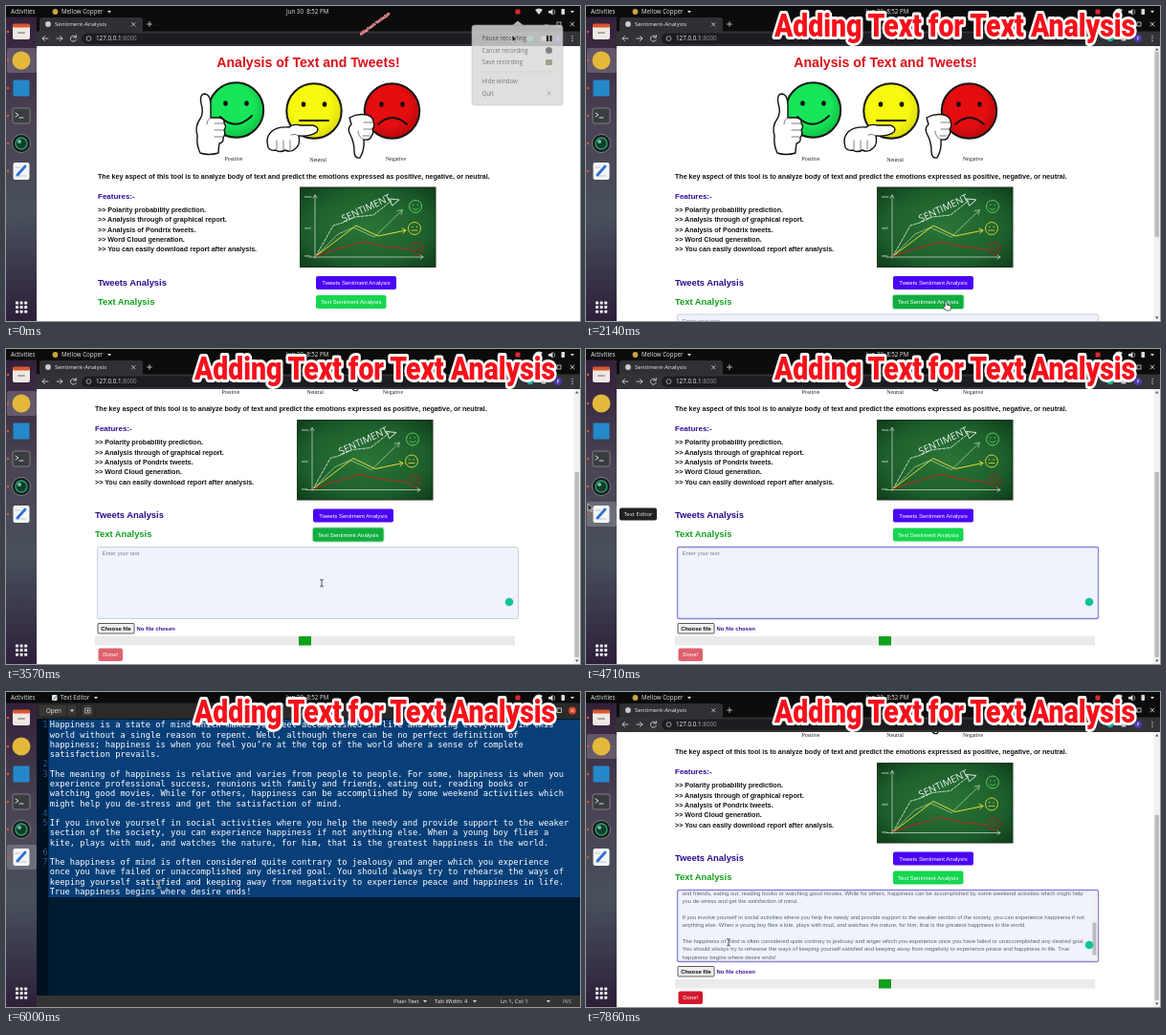
An HTML page that plays this animation: 600x330 px, repeating every 8000 ms.

```html
<!DOCTYPE html>
<html lang="en">
<head>
<meta charset="utf-8">
<title>Text analysis demo</title>
<style>
html, body { margin: 0; width: 100%; height: 100%; overflow: hidden; background: #fff; }
svg { display: block; width: 600px; height: 330px; }
text { white-space: pre; font-family: "Liberation Sans", Arial, sans-serif; }
.b { font-weight: 700; }
.ui { font-family: "Open Sans", "Noto Sans", sans-serif; }
.serif { font-family: "Liberation Serif", serif; }
.mono { font-family: "DejaVu Sans Mono", monospace; }
.title { font-family: Roboto, sans-serif; font-weight: 900; }
</style>
</head>
<body>
<svg id="stage" viewBox="0 0 600 330" xmlns="http://www.w3.org/2000/svg"></svg>
<script>
const STEP = 1000 / 7, LOOP = 8000;

// Text is placed by its left edge and vertical middle.
const text = (x, mid, size, str, fill, cls = "", more = "") =>
  `<text x="${x}" y="${mid + size * .35}" font-size="${size}" fill="${fill}" class="${cls}" ${more}>${str}</text>`;
const centred = (x, mid, size, str, fill, cls) => text(x, mid, size, str, fill, cls, 'text-anchor="middle"');
const rect = (x, y, w, h, fill, r = 0, more = "") =>
  `<rect x="${x}" y="${y}" width="${w}" height="${h}" rx="${r}" fill="${fill}" ${more}/>`;
const disc = (x, y, r, fill, more = "") => `<circle cx="${x}" cy="${y}" r="${r}" fill="${fill}" ${more}/>`;
const line = (d, stroke, w = 1, more = "") =>
  `<path d="${d}" fill="none" stroke="${stroke}" stroke-width="${w}" stroke-linecap="round" stroke-linejoin="round" ${more}/>`;
const shape = (d, fill, stroke = "none", w = 1) =>
  `<path d="${d}" fill="${fill}" stroke="${stroke}" stroke-width="${w}" stroke-linejoin="round"/>`;
const group = (id, body, more = "") => `<g id="${id}" ${more}>${body}</g>`;

function face(x, y, grad, mouth) {
  return disc(x, y, 28.7, `url(#${grad})`, 'stroke="#161616" stroke-width="2"') +
    `<ellipse cx="${x - 11}" cy="${y - 7}" rx="2.3" ry="2.7" fill="#111"/>` +
    `<ellipse cx="${x + 11}" cy="${y - 7}" rx="2.3" ry="2.7" fill="#111"/>` + line(mouth, "#111", 1.8);
}

const hand = (d, folds) => shape(d, "#fff", "#111", 1.4) + line(folds, "#444", .7);

function smiley(x, y, color, bend) {
  return disc(x, y, 6.5, "none", `stroke="${color}" stroke-width=".9"`) +
    disc(x - 2.2, y - 1.6, .7, color) + disc(x + 2.2, y - 1.6, .7, color) +
    line(`M${x - 3} ${y + 2}q3 ${bend} 6 0`, color, .8);
}

function board() {
  return rect(307.5, 190, 141.5, 83.5, "url(#chalk)", 0, 'stroke="#20331f" stroke-width="1"') +
    line("M323 198V264M317 263H436", "#d7e3d5", .7) +
    line("M321 201l2-3 2 3M433 261l3 2-3 2", "#d7e3d5", .7) +
    text(312, 200, 4, "max", "#e5eee2") + text(312, 233, 4, "mid", "#e5eee2") + text(312, 262, 4, "min", "#e5eee2") +
    line("M324 262L342 230L352 227L365 221L384 219L403 204", "#eef4ea", .8, 'stroke-dasharray="3 1.5"') +
    line("M324 262L347 239L363 232L385 242L414 214M409 214.5l5.5-1-1.5 5", "#a5cf98", .8) +
    line("M324 262L366 230L389 241L418 235M414 233l4 2-3 3", "#e3dd35", 1) +
    line("M324 262L345 255L373 247L397 252L422 255", "#c9211f", 1.2, 'stroke-dasharray="1.2 1.6"') +
    `<g transform="translate(353 227) rotate(-25)">${text(0, -4, 10.2, "SENTIMENT", "#f2f6ef", "ui")}</g>` +
    line("M401 202l10 1-7 6z", "#f2f6ef", .9) +
    smiley(428, 210, "#65d95c", 3) + smiley(427, 233, "#e3dd35", 0) + smiley(430, 254, "#b9201e", -3);
}

function button(id, y, w, color, label) {
  return group(id, rect(324, y, w, 14, color, 2) + centred(324 + w / 2, y + 7, 6, label, "#fff"));
}

const features = ["Polarity probability prediction.", "Analysis through of graphical report.",
  "Analysis of Pondrix tweets.", "Word Cloud generation.", "You can easily download report after analysis."];

const pasted = [
  "and friends, eating out, reading books or watching good movies. While for others, happiness can be accomplished by some weekend activities which might help",
  "you de-stress and get the satisfaction of mind.", "",
  "If you involve yourself in social activities where you help the needy and provide support to the weaker section of the society, you can experience happiness if not",
  "anything else. When a young boy flies a kite, plays with mud, and watches the nature, for him, that is the greatest happiness in the world.", "",
  "The happiness of mind is often considered quite contrary to jealousy and anger which you experience once you have failed or unaccomplished any desired goal.",
  "You should always try to rehearse the ways of keeping yourself satisfied and keeping away from negativity to experience peace and happiness in life. True",
  "happiness begins where desire ends!"];

const essay = [
  "Happiness is a state of mind which makes you feel accomplished in life and having everything in this",
  "world without a single reason to repent. Well, although there can be no perfect definition of",
  "happiness; happiness is when you feel you’re at the top of the world where a sense of complete",
  "satisfaction prevails.", "",
  "The meaning of happiness is relative and varies from people to people. For some, happiness is when you",
  "experience professional success, reunions with family and friends, eating out, reading books or",
  "watching good movies. While for others, happiness can be accomplished by some weekend activities which",
  "might help you de-stress and get the satisfaction of mind.", "",
  "If you involve yourself in social activities where you help the needy and provide support to the weaker",
  "section of the society, you can experience happiness if not anything else. When a young boy flies a",
  "kite, plays with mud, and watches the nature, for him, that is the greatest happiness in the world.", "",
  "The happiness of mind is often considered quite contrary to jealousy and anger which you experience",
  "once you have failed or unaccomplished any desired goal. You should always try to rehearse the ways of",
  "keeping yourself satisfied and keeping away from negativity to experience peace and happiness in life.",
  "True happiness begins where desire ends!"];
const numbered = [0, 4, 5, 9, 10, 13, 14];

function form() {
  return rect(98.5, 323, 440, 75, "#eef3fc", 2, 'id="box" stroke="#c3ccd8" stroke-width=".9"') +
    group("hint", text(103.5, 329.8, 6, "Enter your text", "#7b838c")) +
    group("filled", pasted.map((s, i) => text(103.5, 326 + i * 8.4, 5.95, s, "#5d646e")).join("") +
      rect(531.5, 324, 6, 73, "#f1f1f1") + rect(532.5, 357, 4, 34, "#b9bcc0"), 'clip-path="url(#boxClip)"') +
    group("helper", disc(529, 380.5, 4.3, "#12c39a")) +
    rect(99, 403, 38, 10.5, "#efefef", 1, 'stroke="#333" stroke-width=".8"') +
    centred(118, 408, 5.9, "Choose file", "#111", "b") + text(139.5, 408, 5.9, "No file chosen", "#3b1390", "b") +
    rect(96, 416.5, 439, 9.5, "#ebebeb") + rect(309, 416.5, 13, 9.5, "#10a01a") +
    group("done", rect(99.5, 429, 25.5, 13.5, "#d2182b", 2) + centred(112.2, 435.8, 6, "Done!", "#fff"));
}

function page() {
  return centred(316, 59.3, 14.1, "Analysis of Text and Tweets!", "#dc0f18", "b") +
    face(240.5, 109, "green", "M224 116Q240 132 257 115") +
    face(322, 110, "yellow", "M307 120H337") +
    face(403.5, 110, "red", "M389 124Q404 110 419 124") +
    hand("M203 154Q199 146 200 136Q197 126 203 118Q207 112 204 102Q202 92 208 92Q214 93 214 104V117H223Q229 118 228 123Q231 126 228 130Q230 134 227 138Q228 143 223 144Q222 150 222 154Q212 157 203 154Z",
      "M218 123h9M218 130h9M218 137h8M214 117q-4 2-4 7") +
    hand("M274 148Q271 138 277 132Q283 126 296 127Q300 123 308 125H321Q328 127 325 132Q318 137 306 136Q308 145 303 149Q298 154 292 151Q286 154 282 151Q276 152 274 148Z",
      "M283 141v9M290 141v10M297 141v9M298 135q4-2 8 1") +
    hand("M359 117Q368 112 377 114Q384 116 384 121Q386 126 383 129Q385 133 382 136Q381 141 374 140Q375 151 370 159Q364 160 364 152Q364 143 360 135Q356 128 361 124Z",
      "M374 122h9M374 129h8M373 136h7M368 131q0 6 6 9") +
    centred(238, 160.3, 5.9, "Positive", "#222", "serif") + centred(326, 160.8, 5.9, "Neutral", "#222", "serif") +
    centred(407.5, 160, 5.9, "Negative", "#222", "serif") +
    text(96, 178.4, 7.11, "The key aspect of this tool is to analyze body of text and predict the emotions expressed as positive, negative, or neutral.", "#111", "b") +
    text(96, 199, 8, "Features:-", "#2f0a96", "b") +
    features.map((s, i) => text(96, 213.5 + i * 10.3, 7.11, "&gt;&gt; " + s, "#111", "b")).join("") +
    board() +
    text(96, 289.5, 9.4, "Tweets Analysis", "#2b0a8c", "b") + text(96, 309.5, 9.4, "Text Analysis", "#10a01c", "b") +
    button("tweetBtn", 283, 84, "#4a05f5", "Tweets Sentiment Analysis") +
    rect(323, 302, 75.5, 16, "#9fe0b1", 3, 'id="halo"') +
    button("textBtn", 303, 73.5, "#16d650", "Text Sentiment Analysis") +
    group("form", form());
}

function browser() {
  return rect(32, 11, 568, 16, "#0c0c0d") + shape("M35 27V15q0-3 3-3H140q3 0 3 3V27z", "#2f3033") +
    rect(32, 26.5, 568, 15.5, "#323337") + disc(44, 19, 2.9, "#c9cbce") +
    text(51, 19, 6.1, "Sentiment-Analysis", "#eceef0", "ui") +
    line("M131.500 17.500l3.500 3.500m0-3.500l-3.500 3.500M150 16.500v5m-2.500-2.500h5", "#d6d8da", .8) +
    line("M44 34h-6m2.500-2.500L38 34l2.500 2.500M53 34h6m-2.500-2.500L59 34l-2.500 2.500", "#d0d2d4", .9) +
    line("M73 32.500A3 3 0 1 0 73.200 35.500M73.300 30.500v2.500h-2.500", "#d0d2d4", .9) +
    rect(79, 28.5, 456, 11.5, "#1c1d20", 5.7) + disc(86.5, 34, 2.4, "none", 'stroke="#c0c2c4" stroke-width=".8"') +
    text(94, 34.2, 6.3, '127.0.0.1<tspan fill="#96999d">:8000</tspan>', "#eceef0", "ui") +
    disc(548, 34, 3.3, "#16b394") + rect(559.5, 31.5, 5, 5, "#c9cbce", 1) +
    disc(577, 34, 4.3, "#4b36a8") + centred(577, 34, 5, "P", "#fff", "ui") +
    [31.5, 34, 36.5].map(y => disc(592, y, .7, "#d0d2d4")).join("") +
    line("M563 20h4M590 17l4 4m0-4l-4 4", "#d8d8d8", .8) + rect(576, 17, 4, 4, "none", 0, 'stroke="#d8d8d8" stroke-width=".8"') +
    rect(32, 42, 568, 288, "#fff") +
    `<g clip-path="url(#view)">${group("page", page())}</g>` +
    group("bar", rect(593.5, 42, 6.5, 288, "#f1f1f1") + rect(594.5, 48, 4.5, 194, "#bdbdbd", 0, 'id="thumb"') +
      shape("M595 46.500h3.500l-1.750-2.500zM595 325.500h3.500l-1.750 2.500z", "#555"));
}

function editor() {
  const y = i => 34.2 + i * 10.28;
  return rect(32, 11, 568, 319, "#001a31") + rect(32, 11, 568, 17, "#2b2a29") +
    rect(34, 13, 40, 13, "#383634", 2, 'stroke="#1e1c1b" stroke-width=".7"') +
    text(42, 19.5, 6.2, "Open", "#eee", "ui") + line("M63.500 14v11", "#1e1c1b", .7) + shape("M67 18.500h4l-2 2.500z", "#ddd") +
    rect(79, 13, 13, 13, "#383634", 2, 'stroke="#1e1c1b" stroke-width=".7"') +
    line("M83 17h5v5h-5zM85.500 18.500v2m-1-1h2", "#ddd", .7) +
    line("M562 20h4", "#ddd", .8) + rect(576, 17, 4.5, 4.5, "none", 0, 'stroke="#ddd" stroke-width=".8"') +
    disc(592, 19.5, 4, "#d8432a") + line("M590.500 18l3 3m0-3l-3 3", "#fff", .7) +
    rect(32, 28, 12.5, 290, "#001122") +
    rect(44.5, 29, 555.5, 41, "#083f78", 0, 'id="mark"') +
    numbered.map((row, i) => text(38.5, y(row), 8.3, i + 1, "#245a96", "mono")).join("") +
    essay.map((s, i) => text(45.7, y(i), 8.76, s, "#fff", "mono")).join("") +
    rect(32, 318, 568, 12, "#353432") +
    text(405, 324, 6, "Plain Text", "#eee", "ui") + shape("M436 323h4l-2 2.500z", "#ddd") +
    text(448, 324, 6, "Tab Width: 4", "#eee", "ui") + shape("M488 323h4l-2 2.500z", "#ddd") +
    text(517, 324, 6, "Ln 1, Col 1", "#eee", "ui") + shape("M565 323h4l-2 2.500z", "#ddd") + text(582, 324, 5.6, "INS", "#bbb", "ui");
}

function dock() {
  let dots = "";
  for (let i = 0; i < 9; i++) dots += rect(10 + i % 3 * 4.6, 309.5 + Math.floor(i / 3) * 4.6, 3, 3, "#eee", .6);
  return rect(0, 11, 32, 319, "url(#dockFill)") + rect(1, 44, 31, 26, "#fff", 2, 'id="active" opacity=".2"') +
    [27, 57, 86, 115, 144, 173].map(y => disc(2, y, 1.2, "#e4572e")).join("") +
    rect(7, 19, 18, 16, "#eee9e4", 2) + rect(7, 18.5, 18, 4, "#d9572c", 1.5) + rect(12, 27, 8, 2, "#aaa5a0", 1) +
    disc(16, 57, 9.5, "#e2b93b") + rect(7.5, 77.5, 17, 17, "#2489ca", 1) +
    rect(7, 107, 18, 16, "#3a3d40", 2, 'stroke="#7d7f80" stroke-width="1"') + line("M10 112l3 2-3 2M14 117h4", "#eee", .9) +
    disc(16, 144, 9.5, "#15191b", 'stroke="#7a8286" stroke-width="1"') + disc(16, 144, 6, "#123d2d", 'stroke="#2ea36a" stroke-width="1.400"') +
    disc(14, 142, 2, "#72bda0") +
    rect(7.5, 164, 17, 18, "#f4f5f7", 2) + line("M10 178h11M10 169h5", "#b3b8bf", .8) + line("M12 177L20 168", "#2f6fd0", 2.8) + dots;
}

function topBar() {
  return rect(0, 0, 600, 11.5, "#0b0b0b") + text(5, 6, 6.2, "Activities", "#e6e6e6", "ui") +
    group("appWeb", disc(51.5, 6, 2.9, "#c9a53c") + text(58, 6, 6.2, "Mellow Copper", "#e6e6e6", "ui") + shape("M106 5h4l-2 2.500z", "#ddd")) +
    group("appEdit", rect(48, 3, 5.5, 6, "#e8eaee", 1) + line("M49.500 7.500l3-3", "#2f6fd0", 1) +
      text(57, 6, 6.2, "Text Editor", "#e6e6e6", "ui") + shape("M92 5h4l-2 2.500z", "#ddd")) +
    text(293, 6, 6.2, "Jun 30  8:52 PM", "#e6e6e6", "ui") +
    rect(532.5, 3.5, 5, 5, "#d82b2b", 1) +
    shape("M553 4q4-3 8 0l-4 5z", "#ddd") + shape("M567 5h2l2.500-2v6.500l-2.500-2h-2z", "#ddd") + line("M573 4q2 2 0 4.500", "#ddd", .7) +
    rect(580.5, 3, 3.5, 6, "#ddd", .7) + shape("M590 5h4l-2 2.500z", "#ddd");
}

function menu() {
  const items = [["Pause recording", 34], ["Cancel recording", 46.5], ["Save recording", 59], ["Hide window", 79], ["Quit", 91.5]];
  return shape("M529 20.500l6-5 6 5z", "#d9d9d9") + rect(487, 20, 95, 84, "#d9d9d9", 3, 'stroke="#b5b5b5" stroke-width=".6"') +
    items.map(([s, y]) => text(497.5, y, 6.2, s, "#5c5c5c", "ui")).join("") +
    line("M494 69H575", "#bdbdbd", .6) + rect(565, 31, 2, 6, "#111") + rect(568.5, 31, 2, 6, "#111") +
    disc(567.5, 46.5, 3.5, "#666") + rect(564, 56, 7, 6, "#8d8f70", 1) + line("M566 90l3 3m0-3l-3 3", "#777", .7);
}

const grad = (id, inner, outer) =>
  `<radialGradient id="${id}" cx=".45" cy=".42" r=".6"><stop offset=".6" stop-color="${inner}"/><stop offset="1" stop-color="${outer}"/></radialGradient>`;

document.getElementById("stage").innerHTML = `<defs>
  ${grad("green", "#18e65a", "#0fbf45")}${grad("yellow", "#f8f810", "#dcd80c")}${grad("red", "#e40d10", "#b8080b")}
  <radialGradient id="chalk" r=".75"><stop offset="0" stop-color="#2a7538"/><stop offset=".6" stop-color="#1d5f2c"/><stop offset="1" stop-color="#0c3616"/></radialGradient>
  <linearGradient id="dockFill" x2="0" y2="1"><stop offset="0" stop-color="#33203a"/><stop offset=".35" stop-color="#4a4354"/><stop offset=".65" stop-color="#48505c"/><stop offset="1" stop-color="#2d1f3a"/></linearGradient>
  <clipPath id="view">${rect(32, 42, 568, 288)}</clipPath><clipPath id="boxClip">${rect(99, 323.5, 439, 74)}</clipPath></defs>` +
  group("web", browser()) + group("edit", editor()) + dock() + topBar() +
  group("tip", rect(35, 166.5, 39, 13, "#202020", 2) + centred(54.5, 173, 6.1, "Text Editor", "#eee", "ui")) +
  group("menu", menu()) +
  group("title", `<g transform="scale(.835 1)"><text class="title" y="12" font-size="34" text-anchor="middle" fill="#f5101a" stroke="#fff" stroke-width="6" stroke-linejoin="round" paint-order="stroke">Adding Text for Text Analysis</text></g>`) +
  group("mouse",
    group("arrow", shape("M0 0V7.500L1.800 6L3 8.700L4.200 8.100L3 5.500H5.300Z", "#222", "#fff", .6)) +
    group("finger", shape("M-1 0q1-1 2 0v3l4 1q1 1 0 4l-1 1h-4l-3-4q0-1 2 0z", "#fff", "#222", .7)) +
    group("beam", line("M-1.500-3.500q1.500 0 1.500 1V3q0 1 1.500 1M1.500-3.500q-1.500 0-1.500 1M0 3q0 1-1.500 1", "#fff", 1.6) +
      line("M-1.500-3.500q1.500 0 1.500 1V3q0 1 1.500 1M1.500-3.500q-1.500 0-1.500 1M0 3q0 1-1.500 1", "#222", .8)));

const $ = id => document.getElementById(id);
const show = (id, on) => $(id).setAttribute("visibility", on ? "inherit" : "hidden");
const set = (id, name, value) => $(id).setAttribute(name, value);

// Rows: step, then values; eased between rows.
const pointer = [[0, 529, 30], [2, 529, 32], [7, 567, 218], [9, 567, 218], [14, 376, 310], [19, 378, 310], [23, 378, 310],
  [25, 330, 245], [27, 330, 245], [32, 2, 162], [35, 2, 162], [38, 160, 201], [49, 160, 201], [52, 149, 262], [56, 149, 262]];
const scroll = [[0, 0], [16, 0], [19, 55.5], [23, 115.5], [56, 115.5]];

function at(rows, k) {
  const i = Math.max(0, rows.findLastIndex(r => r[0] <= k));
  const a = rows[i], b = rows[i + 1] || a;
  const p = b === a ? 0 : (k - a[0]) / (b[0] - a[0]), e = p * p * (3 - 2 * p);
  return a.slice(1).map((v, j) => v + (b[j + 1] - v) * e);
}

function draw(ms) {
  const k = Math.min(55, Math.floor((ms + 5) / STEP));
  const opened = k >= 15, inEditor = k >= 35 && k < 44, hasText = k >= 54;
  const focused = k >= 26 && k < 35 || k >= 51;
  const [x, y] = at(pointer, k), [top] = at(scroll, k);

  show("web", !inEditor); show("appWeb", !inEditor);
  show("edit", inEditor); show("appEdit", inEditor);
  set("active", "y", inEditor || k >= 32 && k < 35 ? 160 : 44);
  show("tip", k >= 32 && k < 35);
  set("mark", "height", k >= 40 ? 186 : 41);

  set("page", "transform", `translate(${opened ? -3 : 0} ${-top})`);
  show("form", opened); show("bar", opened);
  set("thumb", "y", 48 + top * .7);
  show("halo", opened && k < 26);
  $("textBtn").firstChild.setAttribute("fill", k >= 13 && k < 26 ? "#12ad40" : "#16d650");
  set("box", "stroke", focused ? "#8a84d8" : "#c3ccd8");
  set("box", "stroke-width", focused ? 1.3 : .9);
  show("hint", !hasText); show("filled", hasText);
  show("helper", k >= 25);
  set("done", "opacity", hasText ? 1 : .68);

  set("menu", "opacity", [.82, .35][k] || 0);
  const p = Math.min(1, .1 + k * STEP / 1000);
  set("title", "transform", `translate(385.500 ${18.5 + p}) rotate(${-360 * p}) scale(${p})`);

  const overText = inEditor && k >= 37 || k >= 24 && k < 29 || k >= 50;
  const overButton = k >= 13 && k < 24;
  set("mouse", "transform", `translate(${x} ${y})`);
  show("beam", overText); show("finger", overButton); show("arrow", !overText && !overButton);
}

function tick() {
  draw(performance.now() % LOOP);
  requestAnimationFrame(tick);
}
draw(0);
tick();
</script>
</body>
</html>
```
